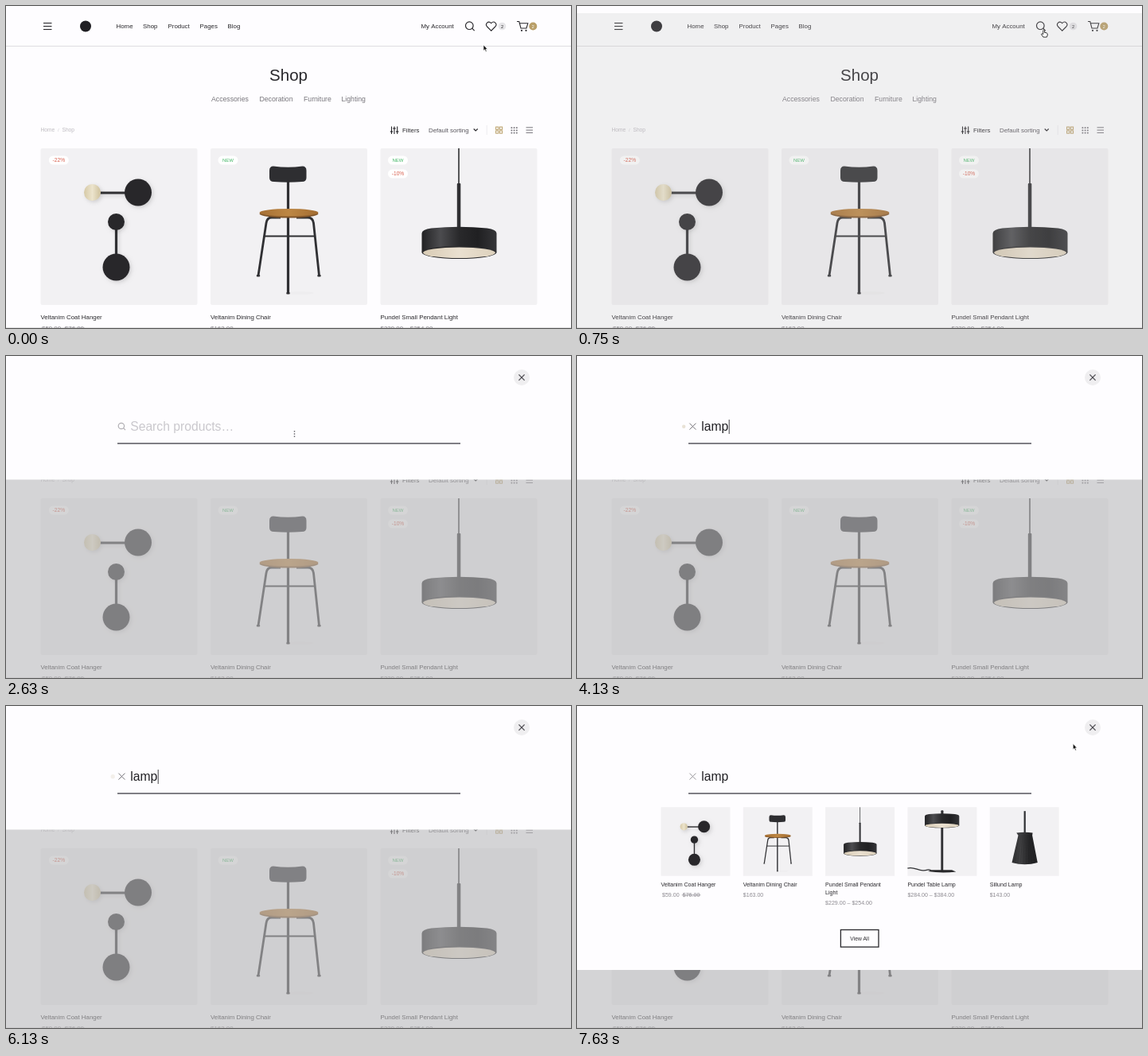
Animation, 710 px wide and 405 px high, one loop 7.76 s. Source, as an HTML page with a canvas:

```html
<!DOCTYPE html>
<html lang="en">
<head>
<meta charset="utf-8">
<title>Shop search</title>
<style>
  html, body { margin: 0; width: 100%; height: 100%; overflow: hidden; background: #fefdff; }
  canvas { display: block; width: 710px; height: 405px; }
</style>
</head>
<body>
<canvas id="stage"></canvas>
<script>
const W = 710, H = 405, LOOP = 7760, TAU = Math.PI * 2;
const INK = '#29282c', GREY = '#77757b', TAN = '#b99f68', PAPER = '#fefdff', CARD = '#f2f1f3';
const canvas = document.getElementById('stage');
const dpr = window.devicePixelRatio || 1;
canvas.width = W * dpr;
canvas.height = H * dpr;
const c = canvas.getContext('2d');

// ---- drawing helpers ----
// y is the middle of the capitals
function text(str, x, y, size, color = INK, align = 'left') {
  c.font = `${size}px "Liberation Sans", Arial, sans-serif`;
  c.fillStyle = color;
  c.textAlign = align;
  c.fillText(str, x, y + size * 0.36);
  return c.measureText(str).width;
}
function box(x, y, w, h, color, r = 0) {
  c.fillStyle = color;
  c.beginPath();
  c.roundRect(x, y, w, h, r);
  c.fill();
}
function disc(x, y, rx, color, ry = rx) {
  c.fillStyle = color;
  c.beginPath();
  c.ellipse(x, y, rx, ry, 0, 0, TAU);
  c.fill();
}
function ring(x, y, r, color, w = 1) {
  c.strokeStyle = color;
  c.lineWidth = w;
  c.beginPath();
  c.arc(x, y, r, 0, TAU);
  c.stroke();
}
function line(color, w, ...pts) {
  c.strokeStyle = color;
  c.lineWidth = w;
  c.beginPath();
  for (let i = 0; i < pts.length; i += 2) c.lineTo(pts[i], pts[i + 1]);
  c.stroke();
}
function path(d, fill, stroke, w = 1) {
  const p = new Path2D(d);
  if (fill) { c.fillStyle = fill; c.fill(p); }
  if (stroke) { c.strokeStyle = stroke; c.lineWidth = w; c.stroke(p); }
}
function at(x, y, scale, draw) {
  c.save();
  c.translate(x, y);
  c.scale(scale, scale);
  draw();
  c.restore();
}
function cross(x, y, r, color, w) {
  line(color, w, x - r, y - r, x + r, y + r);
  line(color, w, x - r, y + r, x + r, y - r);
}
function shade(x0, x1, ...colors) {
  const g = c.createLinearGradient(x0, 0, x1, 0);
  colors.forEach((col, i) => g.addColorStop(i / (colors.length - 1), col));
  return g;
}

// ---- products, on a 197 x 197 card ----
const STEEL = '#303033';

function hanger() {
  c.save();
  c.shadowColor = 'rgba(0,0,0,.14)';
  c.shadowBlur = 5 * dpr;
  c.shadowOffsetX = c.shadowOffsetY = 2 * dpr;
  line(STEEL, 3.2, 75, 56, 108, 56);
  line(STEEL, 3.2, 95, 100, 95, 136);
  disc(65, 55.5, 10.5, shade(54, 76, '#d5c8a4', '#ece4cd', '#cdbf99'));
  disc(122.5, 55.5, 17, '#28272a');
  disc(95, 92.5, 10.5, '#28272a');
  disc(95, 149.5, 17, '#28272a');
  c.restore();
}
function chair() {
  disc(112, 182, 18, 'rgba(0,0,0,.015)', 2);
  line(STEEL, 3.2, 97.5, 40, 97.5, 78);
  path('M79 22.5Q97.5 25 115.5 22.5Q120.5 22.5 120.5 28V37Q120.5 42 115 42Q97.5 43.5 79.5 42Q74 42 74 37V28Q74 22.5 79 22.5Z', '#2e2e31');
  path('M88 87H77Q71 87 70 94L60 160', null, STEEL, 2.8);
  path('M108 87H122Q128.500 87 129.500 94L136.500 160', null, STEEL, 2.8);
  line(STEEL, 2.2, 67, 110.5, 131.5, 110.5);
  line(STEEL, 3.2, 97.5, 84, 97.5, 182);
  for (const [x, y] of [[60, 160.5], [136.5, 160.5], [97.5, 182.5]]) box(x - 2.2, y - 1.5, 4.4, 2.5, STEEL, 1);
  disc(98.5, 82.3, 37, '#80552a', 5.3);
  disc(98.5, 80.8, 37, shade(61, 136, '#a66f33', '#bd8744', '#a26c31'), 4.8);
}
function drum(x0, x1, top, bottom, ry) {
  const mid = (x0 + x1) / 2, rx = (x1 - x0) / 2;
  path(`M${x0} ${top + 8}Q${x0} ${top + 3} ${x0 + 12} ${top + 1.5}Q${mid} ${top - 2} ${x1 - 12} ${top + 1.5}Q${x1} ${top + 3} ${x1} ${top + 8}V${bottom}H${x0}Z`,
    shade(x0, x1, '#222224', '#4c4c4f', '#29292b', '#202022', '#353538'));
  disc(mid, bottom, rx, '#2a2a2c', ry);
  disc(mid, bottom + 0.3, rx - 1.5, shade(x0, x1, '#d8cbb4', '#eae0d0', '#ddd1bc'), ry - 1.2);
}
function pendant() {
  line('#3a3a3c', 1.7, 98.5, 0, 98.5, 45);
  box(96.3, 44, 4.5, 56, STEEL, 1);
  drum(52, 146, 99, 131, 8);
}
function tableLamp() {
  path('M0 174C18 168 30 182 46 180S58 176 68 180', null, STEEL, 3);
  box(95, 9, 7, 12, STEEL, 2);
  box(95, 56, 6.5, 125, STEEL);
  path('M58 183L70 179H126L138 184Q98 189 58 183Z', '#28282a');
  drum(49, 147, 18, 52, 7);
}
function cone() {
  line(STEEL, 5, 99.6, 11, 99.6, 76);
  path('M76 73Q99 69 122 73L121 80L136 158Q100 168 63 158L81 80Z', shade(62, 137, '#2d2d2f', '#414143', '#262628', '#222224'));
  for (let i = 1; i < 9; i++) line('rgba(0,0,0,.18)', 1.2, 80 + i * 4.6, 78, 63 + i * 8.1, 160);
}

const PRODUCTS = [
  { name: ['Veltanim Coat Hanger'], price: '$59.00', was: '$76.00', draw: hanger },
  { name: ['Veltanim Dining Chair'], price: '$163.00', draw: chair },
  { name: ['Pundel Small Pendant', 'Light'], price: '$229.00 – $254.00', draw: pendant },
  { name: ['Pundel Table Lamp'], price: '$284.00 – $384.00', draw: tableLamp },
  { name: ['Sillund Lamp'], price: '$143.00', draw: cone }
];

function price(p, x, y, size) {
  const color = '#8c8a90';
  if (!p.was) return text(p.price, x, y, size, color);
  x += 1.5;
  x += text(p.price, x, y, size, color) + size * 0.6;
  const w = text(p.was, x, y, size, color);
  line(color, 0.8, x - 1, y + 0.3, x + w + 1, y + 0.3);
}

// ---- shop page ----
function header() {
  for (const y of [21.5, 25.5, 29.5]) line(INK, 1.1, 47, y, 57.5, y);
  disc(100, 25.5, 7, '#201f23');
  [['Home', 138.5], ['Shop', 172], ['Product', 203.5], ['Pages', 243.5], ['Blog', 278.5]]
    .forEach(([s, x]) => text(s, x, 25.5, 7.9));
  text('My Account', 521.5, 25.5, 7.9);
  ring(582.3, 24.7, 4.8, INK, 1.2);
  line(INK, 1.2, 585.8, 28.2, 588.7, 31.1);
  path('M609.700 31.200L604.600 26C601.500 22.500 606 17.700 609.700 21.600C613.400 17.700 618 22.500 614.800 26Z', null, INK, 1.1);
  disc(623.5, 25.5, 4.8, '#e6e5e8');
  text('2', 623.5, 25.6, 5.6, INK, 'center');
  path('M642 19.500H644.800L647 28H654L655.800 21.800H645.500', null, INK, 1.1);
  disc(648, 30.8, 1.1, INK);
  disc(653.5, 30.8, 1.1, INK);
  disc(662.3, 25.5, 5, TAN);
  text('2', 662.3, 25.6, 5.4, '#fff', 'center');
  box(0, 50, W, 0.9, '#dfdee1');
}
function toolbar() {
  text('Home', 43.5, 156, 6.6, '#bdbbc0');
  text('/', 65, 156, 6, '#cfcdd2');
  text('Shop', 70.5, 156, 6.6, '#bdbbc0');
  [[484.5, 158], [488, 154], [491.7, 158]].forEach(([x, y]) => {
    line(INK, 1.1, x, 151.5, x, 161);
    line(INK, 1.2, x - 1.7, y, x + 1.7, y);
  });
  text('Filters', 498, 156, 7.9);
  text('Default sorting', 531, 156, 7.85, '#56545a');
  line(INK, 1.1, 587.7, 154.5, 590.2, 157, 592.7, 154.5);
  box(603.8, 150, 0.7, 12, '#e6e5e8');
  for (const x of [615.6, 620.4]) for (const y of [152.1, 156.9]) {
    c.strokeStyle = TAN;
    c.lineWidth = 1;
    c.strokeRect(x, y, 3.2, 3.2);
  }
  for (let i = 0; i < 9; i++) box(634.5 + i % 3 * 3.2, 152.3 + Math.floor(i / 3) * 3.2, 1.8, 1.8, GREY, 0.4);
  for (const y of [152.8, 156.1, 159.4]) line(GREY, 1, 653.5, y, 662, y);
}
function badge(x, y, label, color, size) {
  box(x, y - 5.5, 25, 11, '#fff', 5.5);
  text(label, x + 12.5, y + 0.1, size, color, 'center');
}
function page() {
  box(0, 0, W, H, PAPER);
  header();
  text('Shop', 355, 87, 20.5, INK, 'center');
  [['Accessories', 258], ['Decoration', 318.5], ['Furniture', 374], ['Lighting', 421.5]]
    .forEach(([s, x]) => text(s, x, 117, 8.7, GREY));
  toolbar();
  PRODUCTS.slice(0, 3).forEach((p, i) => {
    const x = 43.5 + i * 213.5;
    box(x, 179, 197, 197, CARD, 2);
    at(x, 179, 1, p.draw);
    text(p.name.join(' '), x, 391, 7.9);
    price(p, x, 405, 7.9);
  });
  const red = '#d8604f', green = '#3fb562';
  badge(53.8, 194, '-22%', red, 6.6);
  badge(266.5, 194, 'NEW', green, 6);
  badge(480, 194, 'NEW', green, 6);
  badge(480, 211, '-10%', red, 6.6);
  box(0, 404, W, 1, 'rgba(0,0,0,.1)');
}

// ---- search panel ----
const typeAt = [3250, 3500, 3750, 4000], RESULTS = 6250;

function results() {
  PRODUCTS.forEach((p, i) => {
    const x = 105.5 + i * 103.3;
    box(x, 127.3, 87, 86.5, CARD);
    at(x, 127.3, 87 / 197, p.draw);
    p.name.forEach((s, n) => text(s, x, 224.7 + n * 10, 7.05));
    price(p, x, 227.5 + p.name.length * 10, 7.05);
  });
  c.strokeStyle = INK;
  c.lineWidth = 1.3;
  c.strokeRect(331.4, 281.5, 47.6, 21.6);
  text('View All', 355.2, 292.3, 6.7, INK, 'center');
}
function panel(t) {
  const e = t - 750, open = t >= RESULTS;
  const dim = 0.6 * (1 - Math.exp(-(e + 53) / 130));
  box(0, 0, W, H, `rgba(186,185,187,${dim})`);

  c.save();
  c.translate(0, -146.5 * Math.exp(-e / 28));
  box(0, 0, W, open ? 332 : 155.5, PAPER);
  disc(648, 27, 10, '#efeef0');
  cross(648, 27, 3.6, '#4c4b50', 1.3);
  line('#55545c', 1.4, 140, 110, 571, 110);

  const word = 'lamp'.slice(0, typeAt.filter(k => t >= k).length);
  let caretX = 156.8;
  if (word) {
    cross(145.4, 88.6, 4, open ? '#9b999e' : '#77757b', 1);
    caretX = 157.2 + text(word, 156.2, 88.6, 15.7, '#1f1e22');
    if (t >= 3750 && !open) {
      const p = (t - 3635) % 900 / 900;
      disc(134.2, 88.7, 1 + 2.2 * p, `rgba(190,170,125,${0.7 * (1 - p)})`);
    }
  } else {
    ring(144.9, 88, 3.7, '#b0aeb3', 1.2);
    line('#b0aeb3', 1.2, 147.6, 90.7, 150, 93.1);
    text('Search products…', 156.2, 88.6, 15.7, '#cac8cd');
  }
  const blink = word ? Math.floor((t - 3750) / 500) : Math.floor((t - 565) / 520);
  if ((word && t < 4250) || blink % 2 === 0) box(caretX - 0.5, 80, 1, 18, '#444348');
  if (open) results();
  c.restore();
}

// ---- mouse ----
const POINTER = {
  arrow: () => path('M0 0V7.200L1.700 5.700L2.900 8.400L4.100 7.900L2.900 5.300H5Z', '#111', '#fff', 0.6),
  hand: () => path('M-.900 .900Q0 -.700 .900 .900V3.600Q3.800 3.500 4.500 5V7.200L3.600 9.300H-.800L-3.200 5.900Q-3 4.500 -1.500 5.300L-.900 5.700Z', '#fff', '#222', 0.9),
  beam: () => {
    for (const y of [-3.2, 0, 3.2]) box(-0.7, y - 0.7, 1.4, 1.4, '#55545a');
  }
};
// time, x, y
const ENTER = [[0, 600, 49], [125, 599, 47], [375, 589, 33], [500, 586.7, 29.8], [1500, 586.7, 29.8], [1750, 430, 88], [1875, 362.5, 98]];
const LEAVE = [[6875, 362, 140], [7125, 450, 172], [7375, 550, 112], [7500, 589.5, 64.5], [7625, 623.3, 47.5]];

function along(keys, t) {
  const n = keys.findIndex(k => k[0] > t);
  if (n < 0) return keys[keys.length - 1].slice(1);
  const a = keys[n - 1], b = keys[n], p = (t - a[0]) / (b[0] - a[0]);
  return [a[1] + (b[1] - a[1]) * p, a[2] + (b[2] - a[2]) * p];
}
function mouse(t) {
  if (t >= 3250 && t < 6875) return;
  const [x, y] = along(t < 3250 ? ENTER : LEAVE, t);
  const kind = t >= 6875 || t < 375 ? 'arrow' : t <= 1500 ? 'hand' : t < 1750 ? 'arrow' : 'beam';
  at(x, y, 1, POINTER[kind]);
}

function clock(ms) {
  let k = Math.min(61, Math.floor(ms / 125));
  if (Math.round(k * 12.5) * 10 > ms + 0.01) k--;
  return k * 125;
}
function render(now) {
  const t = clock(now % LOOP);
  c.setTransform(dpr, 0, 0, dpr, 0, 0);
  page();
  if (t >= 750) panel(t);
  mouse(t);
}
const start = performance.now();
function tick() {
  render(performance.now() - start);
  requestAnimationFrame(tick);
}
tick();
</script>
</body>
</html>
```
